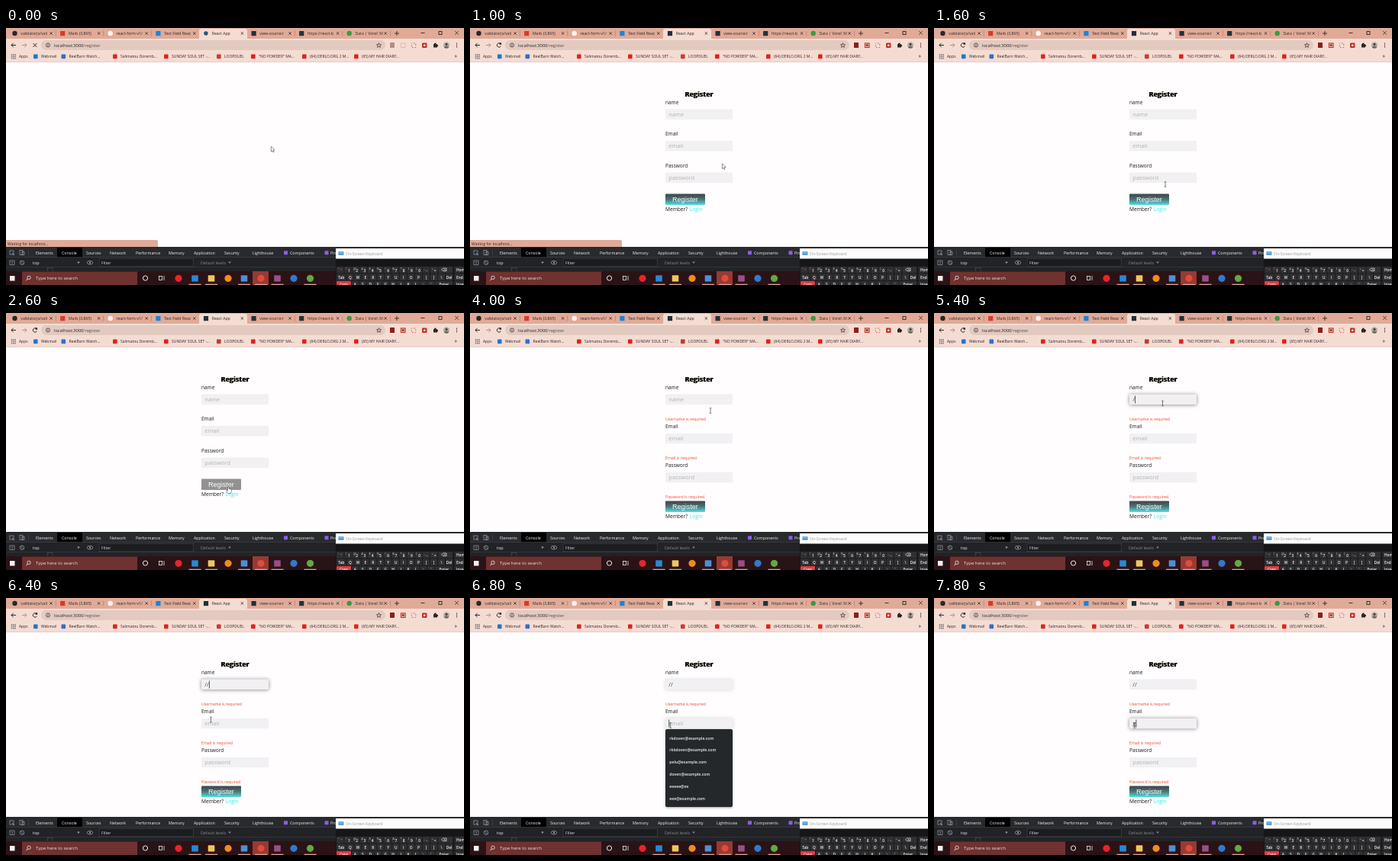
Animation, 600 px wide and 337 px high, one loop 8000 ms. Source, as an HTML page with a canvas:

```html
<!DOCTYPE html>
<html lang="en">
<head>
<meta charset="utf-8">
<title>Register form</title>
<style>
html, body { margin: 0; width: 100%; height: 100%; overflow: hidden; background: #fff; }
canvas { display: block; width: 600px; height: 337px; }
</style>
</head>
<body>
<canvas id="stage" width="600" height="337"></canvas>
<script>
const ctx = document.getElementById('stage').getContext('2d');
const LOOP = 8000, STEP = 200;
const UI = '"Open Sans", "Noto Sans", sans-serif';
const STRIP = '#e0aa97', BAR = '#f5dcd3', INK = '#2e2624';

const clamp = v => Math.max(0, Math.min(1, v));
const ramp = (t, a, b) => clamp((t - a) / (b - a));

function rect(x, y, w, h, color, r = 0) {
  ctx.fillStyle = color;
  ctx.beginPath();
  ctx.roundRect(x, y, w, h, r);
  ctx.fill();
}

function dot(x, y, r, color) {
  ctx.fillStyle = color;
  ctx.beginPath();
  ctx.arc(x, y, r, 0, 7);
  ctx.fill();
}

function ring(x, y, r, color, w = 0.8, from = 0, to = 7) {
  ctx.strokeStyle = color;
  ctx.lineWidth = w;
  ctx.beginPath();
  ctx.arc(x, y, r, from, to);
  ctx.stroke();
}

function line(color, w, ...pts) {
  ctx.strokeStyle = color;
  ctx.lineWidth = w;
  ctx.beginPath();
  for (let i = 0; i < pts.length; i += 2) ctx.lineTo(pts[i], pts[i + 1]);
  ctx.stroke();
}

function box(x, y, w, h, color, lw = 0.8) {
  ctx.strokeStyle = color;
  ctx.lineWidth = lw;
  ctx.strokeRect(x, y, w, h);
}

// y is the baseline
function text(s, x, y, size, color, weight = 400, family = UI) {
  ctx.font = `${weight} ${size}px ${family}`;
  ctx.fillStyle = color;
  ctx.fillText(s, x, y);
}

function cross(x, y, r, color, w = 0.8) {
  line(color, w, x - r, y - r, x + r, y + r);
  line(color, w, x + r, y - r, x - r, y + r);
}

function caretDown(x, y, color) {
  ctx.fillStyle = color;
  ctx.beginPath();
  ctx.moveTo(x - 1.8, y - 1);
  ctx.lineTo(x + 1.8, y - 1);
  ctx.lineTo(x, y + 1.4);
  ctx.fill();
}

const TABS = [
  ['validatorjs/vali', '#24292e', 1],
  ['Mails (3,865)', '#d8392f', 0],
  ['react-form-v1/', '#fff4f0', 1],
  ['Text Field Reac', '#1584e0', 0],
  ['React App', '#20303a', 0],
  ['view-source:r', '#20303a', 0],
  ['https://react-b', '#1c3440', 0],
  ['Data | Vorel: M', '#3a9a47', 1]
];

function drawTabs(loaded) {
  rect(0, 0, 600, 14, STRIP);
  rect(253, 1, 63, 14, BAR, [3, 3, 0, 0]);
  TABS.forEach(([title, color, round], i) => {
    const x = 2.5 + i * 62.6;
    if (i === 4 && !loaded) dot(x + 9, 7, 2.7, '#2a5580');
    else if (round) dot(x + 9, 7, 3.2, color);
    else rect(x + 6, 4, 6.2, 6.2, color, 0.5);
    ctx.save();
    ctx.beginPath();
    ctx.rect(x + 16, 0, 37, 14);
    ctx.clip();
    text(title, x + 16.8, 8.9, 5.15, INK);
    ctx.restore();
    cross(x + 56.5, 7, 1.7, INK);
    if (i !== 3 && i !== 4) rect(x + 62.4, 3.5, 0.6, 7, '#a57766');
  });
  line(INK, 0.9, 509, 7, 515, 7);
  line(INK, 0.9, 512, 4, 512, 10);
  line(INK, 0.9, 543.5, 6.5, 548.5, 6.5);
  box(567, 4.5, 4, 4, INK, 0.9);
  cross(590.5, 6.4, 2.3, INK, 0.8);
}

function drawToolbar(loaded) {
  rect(0, 14, 600, 31, BAR);
  line(INK, 1, 13, 22.5, 7, 22.5);
  line(INK, 1, 9.7, 19.8, 7, 22.5, 9.7, 25.2);
  line('#a89389', 1, 21, 22.5, 27, 22.5);
  line('#a89389', 1, 24.3, 19.8, 27, 22.5, 24.3, 25.2);
  if (loaded) {
    ring(38, 22.5, 2.7, INK, 1, 0.5, 5.6);
    rect(38.6, 19.3, 2.5, 2.5, INK);
  } else cross(38, 22.5, 2.5, INK, 1);

  rect(46, 16, 451, 13, '#e3cac1', 6.5);
  ring(55, 22.5, 2.6, INK, 0.7);
  rect(54.6, 22, 0.8, 2, INK);
  rect(54.6, 20.7, 0.8, 0.8, INK);
  text('localhost:3000', 63, 24.5, 5.7, '#252020');
  const w = ctx.measureText('localhost:3000').width;
  text('/register', 63 + w, 24.5, 5.7, '#5a4d48');

  ctx.strokeStyle = INK;
  ctx.lineWidth = 0.7;
  ctx.beginPath();
  for (let i = 0; i < 10; i++) {
    const a = i * Math.PI / 5 - Math.PI / 2, r = i % 2 ? 1.4 : 3.2;
    ctx.lineTo(488.5 + r * Math.cos(a), 22.8 + r * Math.sin(a));
  }
  ctx.closePath();
  ctx.stroke();

  rect(503, 19, 6, 7, loaded ? '#8c1f1c' : '#b98a84', 0.6);
  box(517.5, 20, 5.5, 5.5, loaded ? '#c2342b' : '#cfb5ad', loaded ? 1.2 : 0.8);
  if (loaded) dot(520.2, 22.7, 1.6, '#b22a24');
  ctx.setLineDash([2, 1.75]);
  ctx.lineDashOffset = 1;
  box(531.3, 20, 5.5, 5.5, '#e2604f', 0.9);
  ctx.setLineDash([]);
  rect(545, 19.5, 6.5, 6.5, '#b9382d', 1);
  dot(548.2, 22.8, 1.2, '#fff');
  rect(560, 21, 5, 4.6, INK, 0.6);
  dot(562.3, 20.7, 1.2, INK);
  dot(565, 23.2, 1.1, INK);

  ctx.save();
  ctx.beginPath();
  ctx.arc(577, 22.5, 4.2, 0, 7);
  ctx.clip();
  rect(572, 18, 10, 10, '#b9b4a6');
  dot(577, 21.4, 1.7, '#594238');
  dot(577, 26.8, 3.3, '#66706f');
  ctx.restore();
  for (let i = -1; i < 2; i++) dot(590.5, 22.5 + i * 2.3, 0.7, INK);
}

const RED = '#e3201f';
const MARKS = [
  ['Webmail', 46, '#2277c8'],
  ['ReelBarn Watch...', 82.5, '#2f6fd0'],
  ['Salimatou Doremb...', 150, RED],
  ['SUNDAY SOUL SET -...', 217, RED],
  ['LOOPDUEL', 286, '#c83a30'],
  ['"NO POWDER" MA...', 331, RED],
  ['(64) DERLO.ORG 2 M...', 398, RED],
  ['(65) MY HAIR DIARY...', 466, RED]
];

function drawBookmarks() {
  for (let i = 0; i < 9; i++) {
    const c = ['#dc5140', '#4b83dd', '#3d9b5b'][(i + (i / 3 | 0)) % 3];
    rect(6.7 + i % 3 * 2.3, 34.2 + (i / 3 | 0) * 2.3, 1.6, 1.6, c);
  }
  text('Apps', 17, 39.1, 4.95, INK);
  for (const [s, x, color] of MARKS) {
    rect(x - 10, 34.6, 5.6, 5.6, color, 1);
    text(s, x, 39.1, 5, INK);
  }
  text('»', 587.5, 39.4, 7, INK);
  rect(0, 44, 600, 0.8, '#e2c9c0');
}

function field(y, hint, value, glow, caret) {
  ctx.save();
  if (glow > 0) {
    ctx.shadowColor = `rgba(0,0,0,${0.48 * glow})`;
    ctx.shadowBlur = 5;
    ctx.shadowOffsetY = 0.4;
  }
  rect(256, y, 88, 13.5, '#f1f0f2', 1.5);
  ctx.restore();
  text(value || hint, 260.3, y + 9.3, 7.5, value ? '#4b4b4d' : '#b4b3b6');
  if (caret) {
    const w = value ? ctx.measureText(value).width : 0;
    rect(260.4 + w, y + 1.8, 0.8, 10, '#333');
  }
}

function drawForm(t) {
  const errors = t >= 2800, gap = errors ? 51.1 : 41.4;
  const hover = t >= 2400 && t < 2800;
  const name = t >= 5600 ? '//' : t >= 5200 ? '/' : '';
  const mail = t >= 7600 ? 'g' : '';
  const lastKey = [7600, 6800, 5600, 5200, 4800].find(k => t >= k);
  const blink = lastKey !== undefined && Math.floor((t - lastKey) / 400) % 2 === 0;
  const onMail = t >= 6800;
  const rows = [
    ['name', 'name', name, ramp(t, 4600, 5000) * (1 - ramp(t, 6520, 6920)), blink && !onMail, 'Username is required'],
    ['Email', 'email', mail, ramp(t, 6700, 6980), blink && onMail, 'Email is required'],
    ['Password', 'password', '', 0, false, 'Password is required']
  ];

  text('Register', 281.9, 90.4, 9.1, '#3a2a10', 700);
  text('Register', 281.2, 90, 9.1, '#050404', 700);
  rows.forEach(([label, hint, value, glow, caret, error], i) => {
    const y = 100 + i * gap;
    text(label, 256, y, 6.5, '#191919');
    field(y + 6.6, hint, value, glow, caret);
    if (errors) text(error, 256, y + 41.2, 5.25, '#ea4a30');
  });

  const by = errors ? 246.5 : 217.5;
  let fill = '#929292';
  if (!hover) {
    fill = ctx.createLinearGradient(0, by, 0, by + 14.5);
    fill.addColorStop(0, '#3f4248');
    fill.addColorStop(0.5, '#4b7478');
    fill.addColorStop(1, '#50dfe3');
  }
  rect(256, by, 52, 14.5, fill, 1);
  text('Register', 265, by + 10.4, 9.1, '#fff', 400, '"Liberation Sans", Arial, sans-serif');
  text('Member?', 256, by + 22.4, 6.6, '#191919');
  text('Login', 287.8, by + 22.4, 6.6, '#43e4f2');

  if (t >= 6800 && t < 7600) drawSuggestions();
}

function drawSuggestions() {
  ctx.save();
  ctx.shadowColor = 'rgba(0,0,0,.35)';
  ctx.shadowBlur = 3;
  ctx.shadowOffsetY = 1;
  rect(256, 172, 88, 102, '#25282b', 2);
  ctx.restore();
  ['rkdoven@example.com', 'rkkdoven@example.com', 'pelu@example.com',
    'doven@example.com', 'eeeee@ex', 'eee@example.com'
  ].forEach((s, i) => text(s, 261.3, 185.5 + i * 15.8, 5.15, '#eceded', 600));
}

const PANELS = [['Elements', 39], ['Console', 73], ['Sources', 105], ['Network', 136],
  ['Performance', 170], ['Memory', 213], ['Application', 246], ['Security', 286],
  ['Lighthouse', 323], ['Components', 372], ['Profiler', 425]];

function drawDevtools() {
  const grey = '#9aa0a6';
  rect(0, 287, 600, 14, '#292a2d');
  rect(0, 301, 600, 18, '#222326');
  rect(67, 288, 33, 12.5, '#000');
  rect(0, 300.5, 600, 0.6, '#44464a');
  rect(0, 313.5, 600, 0.6, '#44464a');
  box(54.5, 314.5, 6.5, 6, '#44464a', 0.8);
  box(5, 292, 5, 5, grey, 0.7);
  line(grey, 1, 8, 295, 11, 298);
  box(18, 291.5, 4, 6, grey, 0.7);
  box(21, 293.5, 3, 4, grey, 0.7);
  rect(29, 290.5, 0.6, 8, '#4a4c50');
  for (const [s, x] of PANELS) text(s, x, 296.7, 5.3, '#f0f1f3');
  rect(364, 292.2, 5, 5, '#8a5cf0', 0.8);
  rect(417.5, 292.2, 5, 5, '#8a5cf0', 0.8);

  box(5, 305, 6, 5.5, grey, 0.7);
  line(grey, 0.8, 7.3, 306.3, 9, 307.8, 7.3, 309.2);
  ring(21, 307.7, 2.7, grey);
  line(grey, 0.8, 19.2, 305.9, 22.8, 309.5);
  text('top', 35, 309.6, 5.5, '#f0f1f3');
  caretDown(95, 307.6, grey);
  ctx.strokeStyle = grey;
  ctx.lineWidth = 0.8;
  ctx.beginPath();
  ctx.ellipse(110, 307.7, 3.7, 2.3, 0, 0, 7);
  ctx.stroke();
  dot(110, 307.7, 1.1, grey);
  rect(122, 302.5, 123.5, 10.3, '#1b1c1e');
  box(122, 302.5, 123.5, 10.3, '#44474b', 0.6);
  text('Filter', 125, 309.6, 5.3, '#d6d8db');
  text('Default levels', 255, 309.6, 5.3, '#85888d');
  caretDown(293, 307.6, '#85888d');
}

const APPS = [
  [226, '#e3262b', 1], [247.5, '#2589d8', 0], [269, '#f0c65c', 0], [291, '#ee8c22', 1],
  [312, '#4d8fd8', 0], [334, '#e04b3c', 1], [355.5, '#9a4e86', 0], [377, '#2f7ad0', 1], [398.5, '#65a843', 1]
];

function drawTaskbar() {
  rect(0, 319, 600, 18, '#2a1316');
  rect(21, 319.5, 151, 17.5, '#6f3230');
  rect(5, 325, 6.5, 6.5, '#f5f2f2');
  ring(30, 327.3, 2.2, '#eee');
  line('#eee', 0.9, 28.4, 329, 26.3, 331.3);
  text('Type here to search', 39, 330.4, 6, '#ece2e1');
  ring(182.5, 328, 3.1, '#f3eeee', 1);
  box(200.5, 325.5, 4, 5, '#f3eeee', 0.8);
  line('#f3eeee', 0.8, 207, 325, 207, 331);
  rect(323, 319, 21, 18, '#963a35');
  APPS.forEach(([x, color, round], i) => {
    if (round) dot(x, 328.3, 4.6, color);
    else rect(x - 4.3, 324.2, 8.6, 8.2, color, 0.6);
    if ([1, 2, 4, 5, 6, 8].includes(i)) rect(x - 8, 335.7, 16, 1.3, '#dca194');
  });
}

function key(s, x, y, w, color = '#303033', size = 4.8) {
  rect(x, y, w, 8.7, color);
  ctx.textAlign = 'center';
  text(s, x + w / 2, y + 6.2, size, '#f0f0f0', 600);
  ctx.textAlign = 'left';
}

function drawKeyboard() {
  rect(432, 289, 168, 48, '#161618');
  rect(432, 289, 168, 13.5, '#fdfcfc');
  rect(435.5, 293.2, 7, 4.6, '#3f91d2', 0.6);
  for (let i = 0; i < 3; i++) rect(436.5 + i * 1.9, 294.6, 1.1, 0.9, '#fff');
  text('On-Screen Keyboard', 445, 297.7, 5.1, '#9b9b9d');

  const shifted = '~!@#$%^&*()_+', plain = '`1234567890-=';
  for (let i = 0; i < 13; i++) {
    const x = 433 + i * 10.25;
    rect(x, 312.8, 9.5, 8.7, '#303033');
    text(shifted[i], x + 1.5, 316.9, 4, '#d8d8d8');
    text(plain[i], x + 4.8, 320, 4.8, '#f0f0f0', 600);
  }
  rect(566.3, 312.8, 19, 8.7, '#303033');
  line('#eee', 0.7, 572.5, 315, 577, 315, 577, 318.6, 572.5, 318.6, 570.5, 316.8, 572.5, 315);
  cross(574.5, 316.8, 0.9, '#eee', 0.6);

  key('Tab', 433, 322.3, 12.5);
  [...'QWERTYUIOP[]\\'].forEach((c, i) => key(c, 446.4 + i * 9.95, 322.3, 9.2));
  key('Del', 575.8, 322.3, 9.6);
  key('Caps', 433, 331.8, 19, '#dc3e46');
  [...'ASDFGHJKL;\''].forEach((c, i) => key(c, 452.8 + i * 9.95, 331.8, 9.2));
  key('Enter', 562.2, 331.8, 23.2);
  ['Home', 'End', 'Insert'].forEach((s, i) => {
    const y = 312.8 + i * 9.5;
    rect(587.5, y, 12.5, 8.7, '#303033');
    text(s, 590, y + 6.2, 4.8, '#f0f0f0', 600);
  });
}

const PATH = [
  [0, 347, 155], [200, 347, 155], [1200, 328, 180], [1600, 303, 205], [2400, 291, 227],
  [2600, 290.5, 227], [2800, 290.5, 227], [3400, 306, 190], [3800, 306, 190], [4000, 315, 128],
  [4800, 299.5, 118.5], [5800, 299.5, 118.5], [6600, 262.7, 167], [8000, 262.7, 167]
];

function pointerAt(t) {
  const i = Math.max(1, PATH.findIndex(p => p[0] >= t));
  const [t0, x0, y0] = PATH[i - 1], [t1, x1, y1] = PATH[i];
  const k = ramp(t, t0, t1), e = k * k * (3 - 2 * k);
  return [x0 + (x1 - x0) * e, y0 + (y1 - y0) * e];
}

function shape(x, y, pts) {
  ctx.beginPath();
  for (let i = 0; i < pts.length; i += 2) ctx.lineTo(x + pts[i], y + pts[i + 1]);
  ctx.closePath();
  ctx.fillStyle = '#fff';
  ctx.fill();
  ctx.strokeStyle = '#444';
  ctx.lineWidth = 0.6;
  ctx.stroke();
}

function drawPointer(t) {
  const [x, y] = pointerAt(t);
  if (t >= 2200 && t < 3000) {
    shape(x, y, [0, 0, 1.3, 0, 1.5, 3.3, 4.7, 4.2, 5, 6.5, 4, 9.6, 0.3, 9.6, -2, 6.2, -1.3, 5.3, 0, 6.2]);
  } else if (t < 1400 || (t >= 3000 && t < 4000)) {
    shape(x, y, [0.4, 0.3, 0.4, 7.2, 2, 5.8, 3, 8, 4.1, 7.5, 3.1, 5.3, 5.2, 5.1]);
  } else {
    line('#444', 0.7, x, y - 3.2, x, y + 3.2);
    line('#444', 0.6, x - 1.4, y - 3.3, x + 1.4, y - 3.3);
    line('#444', 0.6, x - 1.4, y + 3.3, x + 1.4, y + 3.3);
  }
}

function draw(t) {
  const loaded = t >= 1000;
  rect(0, 0, 600, 337, '#fffdfe');
  drawTabs(loaded);
  drawToolbar(loaded);
  drawBookmarks();
  if (t >= 800) drawForm(t);
  if (t < 1400) {
    rect(0, 278, 199, 10, STRIP, [0, 2, 0, 0]);
    text('Waiting for localhost...', 2, 284.9, 5.2, INK);
  }
  drawDevtools();
  drawTaskbar();
  drawKeyboard();
  drawPointer(t);
}

const start = performance.now();
function tick() {
  const t = (performance.now() - start) % LOOP;
  draw(Math.floor(t / STEP) * STEP);
  requestAnimationFrame(tick);
}
tick();
</script>
</body>
</html>
```
